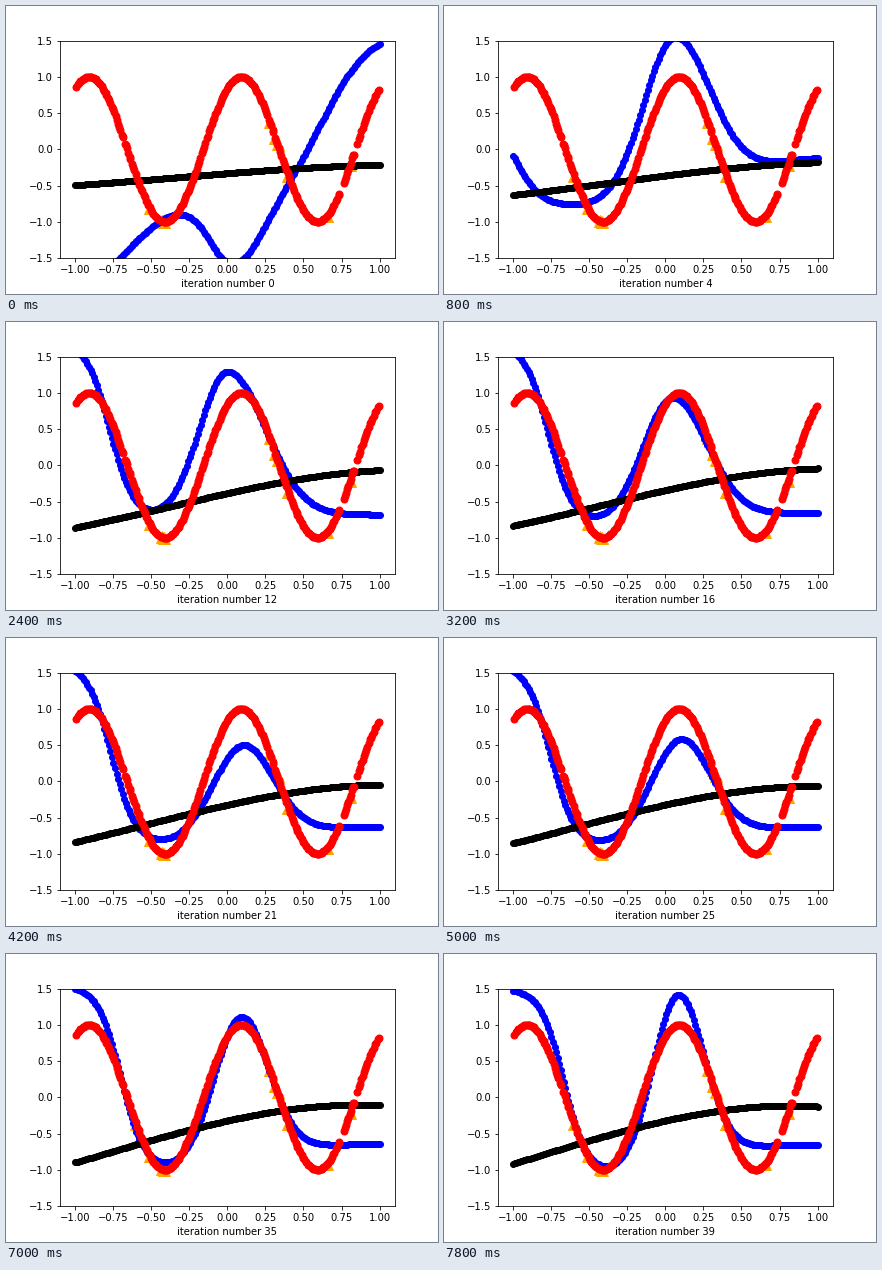
These frames come from a looping animation (432x288 px, 8 s). A matplotlib script:

```python
import numpy as np
import matplotlib.pyplot as plt
from matplotlib.animation import FuncAnimation

FRAMES = 40

# Blue curve: left plateau, floor and right plateau joined by two steps,
# plus one bump. Each entry shapes the curve at that iteration:
# left, step centre, step width, floor, step centre, right,
# bump centre, bump height, bump width on its left and right side
SHAPES = {
    0: (-2.0, -.64, .30, -.72, .64, 1.65, .04, -.90, .21, .27),
    4: (.45, -.98, .16, -.78, .50, -.10, .06, 2.29, .29, .35),
    12: (1.75, -.775, .16, -.75, .25, -.68, 0, 2.03, .265, .35),
    21: (1.65, -.765, .16, -.88, .25, -.63, .10, 1.31, .285, .28),
    39: (1.50, -.67, .15, -1.06, .25, -.65, .08, 2.37, .235, .245),
}


def step(x, centre, width):
    return (1 + np.tanh((x - centre) / width)) / 2


def shape_at(i):
    """Shape between two entries; the last stretch starts slowly."""
    keys = list(SHAPES)
    k = min(np.searchsorted(keys, i, side='right'), len(keys) - 1)
    start, end = keys[k - 1], keys[k]
    u = (i - start) / (end - start)
    if end == keys[-1]:
        u **= 1.6
    a, b = np.array(SHAPES[start]), np.array(SHAPES[end])
    return a + (b - a) * u


def adapted(x, i):
    left, a, wa, floor, b, right, p, h, w_left, w_right = shape_at(i)
    width = np.where(x < p, w_left, w_right)
    return (floor + (left - floor) * (1 - step(x, a, wa))
            + (right - floor) * step(x, b, .3)
            + h * np.exp(-((x - p) / width)**2))


def initial(x, i):
    """Black curve: it tilts up early on and bends slowly."""
    base = -.322 - .08 * np.exp(-((i - 9) / 6)**2)
    tilt = .165 + .3 * min(i / 12, 1)
    bend = .025 + .0045 * i
    return base + tilt * (x - .15 * x**3) - bend * x**2


def wave(x):
    return np.sin(2 * np.pi * x + 1)


def sample_points():
    """Slightly uneven samples with a few holes."""
    rng = np.random.default_rng(4)
    x = np.linspace(-.993, .995, 240)
    x[1:-1] += rng.uniform(-.0025, .0025, len(x) - 2)
    for lo, hi in ((-.687, -.670), (.735, .765), (.829, .853)):
        x = np.append(x[(x <= lo) | (x >= hi)], (lo, hi))
    return np.sort(x)


fig, ax = plt.subplots(figsize=(6, 4), dpi=72)
fig.subplots_adjust(left=.125, right=.9, bottom=.125, top=.88)
ax.set_xlim(-1.1, 1.1)
ax.set_ylim(-1.5, 1.5)

grid = np.linspace(-1, 1, 200)
train = np.array([-.60, -.51, -.43, -.415, .28, .315, .33, .40, .655, .805])
dense = sample_points()

ax.plot(train, wave(train), '^', color='orange', markersize=12)
blue, = ax.plot([], [], 'o', color='blue')
black, = ax.plot([], [], 'o', color='black')
ax.plot(dense, wave(dense), 'o', color='red', markersize=7)
label = ax.set_xlabel('iteration number 0')


def draw(i):
    blue.set_data(grid, adapted(grid, i))
    black.set_data(grid, initial(grid, i))
    label.set_text(f'iteration number {i}')
    return blue, black, label


anim = FuncAnimation(fig, draw, frames=FRAMES, interval=200,
                     init_func=lambda: draw(0), repeat=True, repeat_delay=0)
plt.show()
```
